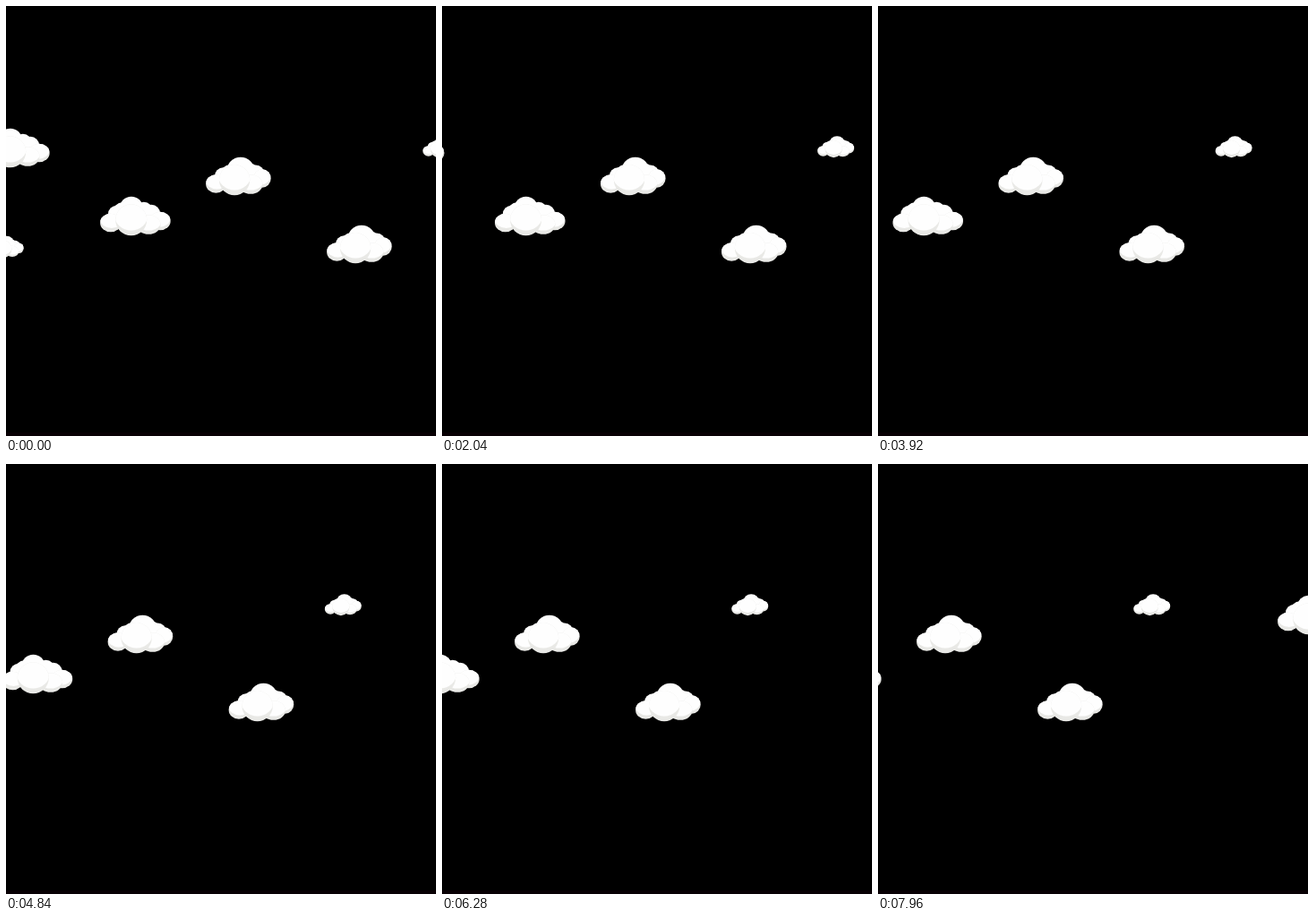
These frames come from a looping animation (480x480 px, 8000 ms). An HTML page with a canvas:

```html
<!DOCTYPE html>
<html lang="en">
<head>
<meta charset="utf-8">
<title>Drifting clouds</title>
<style>
  html, body { margin: 0; width: 100%; height: 100%; overflow: hidden; background: #000; }
  canvas { display: block; width: 100vw; height: 100vh; }
</style>
</head>
<body>
<canvas id="sky" width="480" height="480"></canvas>
<script>
const ctx = document.getElementById('sky').getContext('2d');
const LOOP = 8000, STEP = 40, SPEED = 180 / 7960;
const WHITE = '#fefefe', SHADE = '#e9e9e6';

const point = (x, y) => ({ x, y });
const mix = (a, b, f) => a + (b - a) * f;

// A cloud is described by its size, its top lobe and its two end lobes.
const broad = { width: 72, height: 42, left: point(11, 29.5), peak: point(38.5, 14.5), right: point(62.5, 23.5) };
const peaked = { width: 78, height: 43, left: point(11.5, 29), peak: point(34.5, 12), right: point(66.5, 27) };

function fillEllipse(x, y, rx, ry, color) {
  ctx.fillStyle = color;
  ctx.beginPath();
  ctx.ellipse(x, y, rx, ry, 0, 0, Math.PI * 2);
  ctx.fill();
}

function whiteLobe(x, y, rx, ry = rx) {
  fillEllipse(x, y, rx + 0.3, ry + 0.3, WHITE);
}

// The shaded rim shows below a white copy that is shifted up inside the lobe.
function shadedLobe(x, y, rx, ry, rim, shift = 0) {
  ctx.save();
  fillEllipse(x, y, rx + 0.3, ry + 0.3, SHADE);
  ctx.clip();
  fillEllipse(x + shift, y - rim, rx + 1.5, ry, WHITE);
  ctx.restore();
}

function drawCloud({ width, height, left, peak, right }) {
  whiteLobe(width / 2, height * 0.6, width * 0.34, height * 0.27);
  whiteLobe(peak.x, peak.y, peak.y + 0.5, peak.y);

  // Shoulders climb along a parabola from each end to the peak.
  for (const end of [left, right]) {
    for (const f of [0.75, 0.55]) {
      whiteLobe(mix(end.x, peak.x, f * f), mix(end.y, peak.y, f), 9.7);
    }
  }

  shadedLobe(right.x, right.y, width - right.x, 10, 3, -1.5);
  shadedLobe(left.x, left.y, left.x, 10, 4, 1);
  shadedLobe(width * 0.69, height - 12, 13, 10.5, 4);

  const belly = height * 0.4;
  shadedLobe(width * 0.44, height - belly, belly, belly, 5.5);
}

const clouds = [
  { shape: peaked, x: -30, y: 137 },
  { shape: peaked, x: 105, y: 213 },
  { shape: peaked, x: 626, y: 147 },
  { shape: broad, x: 223, y: 169 },
  { shape: broad, x: 358, y: 245 },
  { shape: broad, x: -21.5, y: 257, scale: 0.565 },
  { shape: broad, x: 465, y: 145.3, scale: 0.565 }
];

function draw(time) {
  ctx.fillStyle = '#000';
  ctx.fillRect(0, 0, 480, 480);
  ctx.fillStyle = '#080004';
  ctx.fillRect(0, 476, 480, 4);
  for (const { shape, x, y, scale = 1 } of clouds) {
    ctx.save();
    ctx.translate(x + 0.4 - time * SPEED, y);
    ctx.scale(scale, scale);
    drawCloud(shape);
    ctx.restore();
  }
}

const start = performance.now();
function tick() {
  const time = (performance.now() - start) % LOOP;
  draw(Math.floor(time / STEP) * STEP);
  requestAnimationFrame(tick);
}
tick();
</script>
</body>
</html>
```
